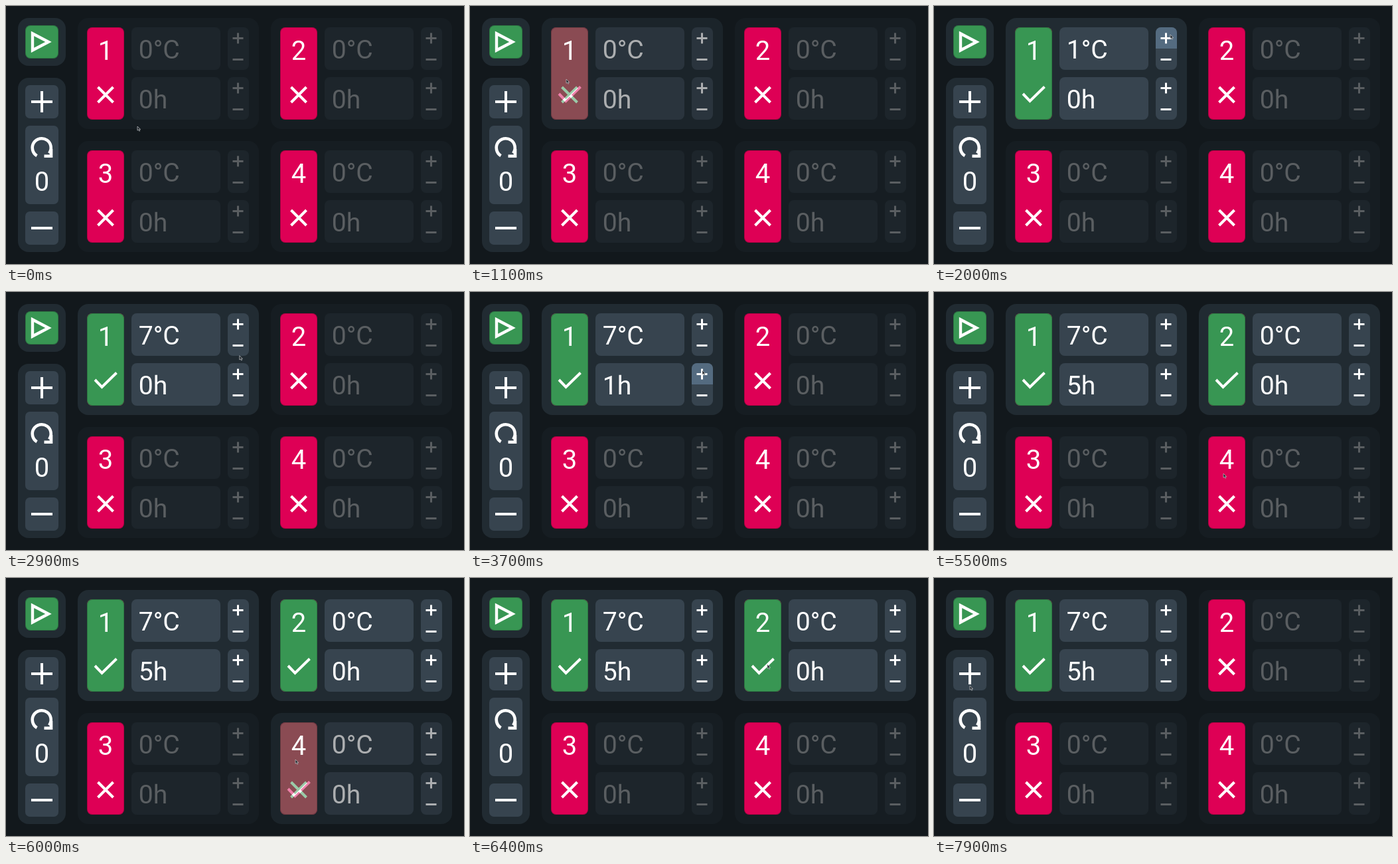
An HTML page for the animation above (8000 ms loop, 690 px wide and 388 px high).

```html
<!DOCTYPE html>
<html lang="en">
<head>
<meta charset="utf-8">
<title>Temperature panel</title>
<style>
  html, body { margin: 0; width: 100%; height: 100%; overflow: hidden; background: #12181c; }
  svg { display: block; width: 100%; height: 100%; }
  text { font: 400 40px Roboto, Inter, sans-serif; fill: #fff; }
  .value { font-size: 39.2px; }
</style>
</head>
<body>
<svg id="stage" viewBox="0 0 690 388"></svg>
<script>
const LOOP = 8000, STEP = 100;
const CARD = "#212b32", KEY = "#37444f", LIT = "#546b80", GREEN = "#389653", RED = "#de0055";
const stage = document.getElementById("stage");

function add(parent, tag, attrs, text = "") {
  const el = document.createElementNS("http://www.w3.org/2000/svg", tag);
  for (const key in attrs) el.setAttribute(key, attrs[key]);
  el.textContent = text;
  parent.appendChild(el);
  return el;
}
const box = (parent, x, y, width, height, rx, fill) =>
  add(parent, "rect", { x, y, width, height, rx, fill });
const line = (parent, d, width) =>
  add(parent, "path", { d, fill: "none", stroke: "#fff", "stroke-width": width });
const digit = (parent, x, y, text) =>
  add(parent, "text", { x, y, "text-anchor": "middle" }, text);
const fade = (el, opacity) => el.setAttribute("opacity", opacity);

function colourKey(parent, x, y, w, h, fill) {
  box(parent, x, y, w, h, 8, fill);
  add(parent, "rect", {
    x: x + 0.5, y: y + 0.5, width: w - 1, height: h - 1, rx: 7.5,
    fill: "none", stroke: "#000", "stroke-opacity": 0.2
  });
}

function makeSidebar() {
  box(stage, 18, 18, 72, 72, 16, CARD);
  colourKey(stage, 29, 29, 50, 50, GREEN);
  line(stage, "M40 41.5V66.5L64 54Z", 4.4);
  box(stage, 18, 108, 72, 262, 16, CARD);
  box(stage, 29, 119, 50, 50, 7, KEY);
  line(stage, "M38 144H70M54 128V160", 4);
  box(stage, 29, 180, 50, 118, 7, KEY);
  line(stage, "M46.5 225.2A14 14 0 1 1 65 221.5M57.5 225.8H68V215", 4.6);
  digit(stage, 54, 278, "0");
  box(stage, 29, 309, 50, 50, 7, KEY);
  line(stage, "M38 334H70", 4);
}

function makeRow(parent, y, unit) {
  const g = add(parent, "g", { transform: `translate(0 ${y})` });
  box(g, 189, 0, 134, 64, 8, KEY);
  box(g, 334, 0, 32, 64, 8, KEY);
  const lit = add(g, "path", { d: "M334 32V8a8 8 0 0 1 8-8h16a8 8 0 0 1 8 8V32Z", fill: LIT });
  line(g, "M341.5 16.5h16m-8-8v16M341.5 48.5h16", 3);
  const value = add(g, "text", { x: 199.7, y: 46.5, class: "value" });
  return { lit, value, unit };
}

function makePanel(i) {
  const g = add(stage, "g", { transform: `translate(${i % 2 * 291} ${(i >> 1) * 185})` });
  const body = add(g, "g");
  box(body, 108, 18, 273, 167, 16, CARD);
  const rows = [makeRow(body, 32, "°C"), makeRow(body, 107, "h")];
  colourKey(g, 122, 32, 56, 139, RED);
  line(g, "M138.5 122l23 23m0-23l-23 23", 4);
  const active = add(g, "g");
  colourKey(active, 122, 32, 56, 139, GREEN);
  line(active, "M134 132L144.5 143L166.5 121.5", 4);
  digit(g, 150, 81, i + 1);
  return { body, active, rows };
}

makeSidebar();
const panels = [0, 1, 2, 3].map(makePanel);
const pointer = add(stage, "path", {
  d: "M0 0V6.2L1.6 4.9L2.7 7.2L3.8 6.7L2.8 4.5H4.6Z",
  fill: "#20252a", stroke: "#c4c8cb", "stroke-width": 0.7
});

// Times at which each panel starts to switch on, off
const SWITCHES = [[1000], [4700, 6800], [], [5500, 5900]];
// Plus keys held in the first panel
const HOLDS = [{ start: 1800, end: 2600, max: 7 }, { start: 3500, end: 4000, max: 5 }];
// Pointer places and arrival times
const HOME = { x: 198, y: 181 };
const MOVES = [
  { at: 600, x: 145, y: 110 },
  { at: 1400, x: 356, y: 43 },
  { at: 3100, x: 350, y: 118 },
  { at: 4300, x: 466, y: 116 },
  { at: 5100, x: 436, y: 273 },
  { at: 6400, x: 448, y: 130 },
  { at: 7100, x: 248, y: 131 },
  { at: 7400, x: 166, y: 201 },
  { at: 7900, x: 54, y: 162 }
];

const ramp = (t, start, span = 200) => Math.min(1, Math.max(0, (t - start) / span));
const easeOut = k => 1 - (1 - k) ** 3;

function pointerAt(t) {
  let { x, y } = HOME;
  for (const move of MOVES) {
    const k = easeOut(ramp(t, move.at - 300, 300));
    x += (move.x - x) * k;
    y += (move.y - y) * k;
  }
  return [x, y];
}

// A held plus key counts once, pauses, then repeats.
function count(t, { start, max }) {
  if (t < start) return 0;
  return Math.min(max, 1 + Math.max(0, Math.round((t - start - 200) / 82)));
}
const glow = (t, { start, end }) => t < start ? 0 : 1 - ramp(t, end);

function render(time) {
  const t = Math.floor(time % LOOP / STEP) * STEP;
  panels.forEach(({ body, active, rows }, i) => {
    const on = SWITCHES[i].reduce((sum, at, n) => sum + (n ? -1 : 1) * ramp(t, at), 0);
    fade(body, 0.3 + 0.7 * on);
    fade(active, on);
    rows.forEach(({ lit, value, unit }, r) => {
      fade(lit, i ? 0 : glow(t, HOLDS[r]));
      value.textContent = (i ? 0 : count(t, HOLDS[r])) + unit;
    });
  });
  pointer.setAttribute("transform", `translate(${pointerAt(t)})`);
}

const began = performance.now();
function tick() {
  render(performance.now() - began);
  requestAnimationFrame(tick);
}
tick();
</script>
</body>
</html>
```
